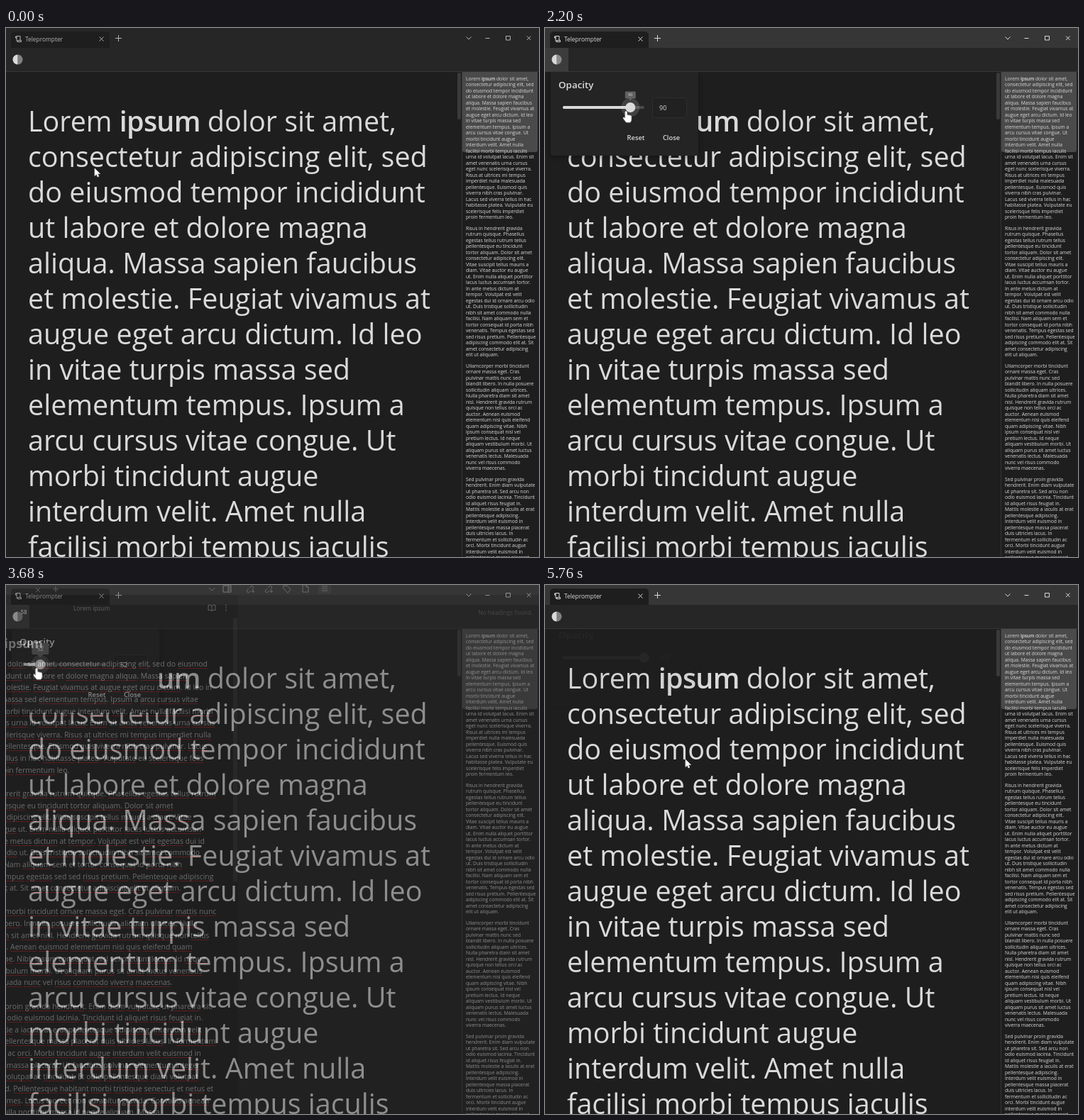
Animation of 751 by 746 pixels, one loop 6000 ms. Source, as an HTML page:

```html
<!DOCTYPE html>
<html lang="en">
<head>
<meta charset="utf-8">
<title>Teleprompter</title>
<style>
  html, body { margin: 0; width: 100%; height: 100%; overflow: hidden; background: #1e1e1e; }
  body { font-family: "Open Sans", "Noto Sans", sans-serif; color: #dadada; }
  #stage { position: relative; width: 751px; height: 746px; overflow: hidden; }
  #stage div, #stage svg { position: absolute; }
  .layer { left: 0; top: 0; width: 751px; height: 746px; overflow: hidden; background: #1e1e1e; }
  .copy { white-space: pre; }
  .copy p { margin: 0; }
  .copy b { font-weight: 600; letter-spacing: -.02em; }
  .large { font-size: 39.5px; line-height: 50px; }
  .large p { margin-bottom: 41.2px; }
  .label { font-size: 8.4px; line-height: 12px; white-space: nowrap; }
  svg { fill: none; stroke: currentColor; overflow: visible; }
  svg text { fill: currentColor; stroke: none; }

  #back .copy { left: -65px; top: 103px; font-size: 10.45px; line-height: 16.64px; }
  #back .copy p { margin-bottom: 16.64px; }
  #back u { text-decoration: underline 1px #b01c1c; text-underline-offset: 2px; text-decoration-skip-ink: none; }
  #back h1 { position: absolute; right: 699px; top: 70px; margin: 0; font-size: 17.7px; line-height: 24px; font-weight: 700; white-space: nowrap; }
  #strip { left: 0; top: 0; width: 751px; height: 14px; background: #363636; }
  #side { left: 327px; top: 14px; width: 424px; height: 732px; background: #262626; }

  #main { left: 31px; top: 105.7px; }
  #mini { left: 648.2px; top: 66.6px; transform: scale(.17); transform-origin: 0 0; }
  #view { left: 643px; top: 62px; width: 106px; height: 113px; background: #4a4a4a; border-radius: 0 0 3px 3px; }
  #bar { left: 0; top: 0; width: 751px; height: 28px; }
  #tab { left: 7px; top: 5px; width: 139px; height: 23px; border-radius: 5px 5px 0 0; background: #1e1e1e; }
  #head { left: 0; top: 28px; width: 751px; height: 33px; background: #262626; border-bottom: 1px solid #363636; }
  #button { left: 0; top: 0; width: 33px; height: 33px; background: #3c3c3c; }

  #popup { left: 8px; top: 61px; width: 208px; height: 119px; border-radius: 4px; background: #242424; box-shadow: 0 2px 7px rgba(0,0,0,.35); }
  #popup .bold { font-weight: 600; font-size: 9.3px; line-height: 24px; height: 24px; width: 44px; top: 82px; text-align: center; border-radius: 3px; }
  #title { left: 11px; top: 9px; font-size: 13.4px; line-height: 20px; font-weight: 600; }
  #rail, #fill { left: 17px; top: 49px; height: 4px; border-radius: 2px; }
  #rail { width: 115px; background: #4a4a4a; }
  #fill { background: #dadada; }
  #knob { left: 17px; top: 51px; }
  #knob div { border-radius: 50%; }
  #halo { left: -13px; top: -13px; width: 26px; height: 26px; background: rgba(218,218,218,.16); }
  #dot { left: -7px; top: -7px; width: 14px; height: 14px; background: #dadada; }
  #knob #tip { left: -12px; top: -30px; width: 24px; height: 16px; border-radius: 2px; background: #616161; font-size: 8.6px; line-height: 16px; text-align: center; transform-origin: 50% 125%; }
  #tip::after { content: ""; position: absolute; left: 9px; top: 13px; width: 6px; height: 6px; background: #616161; transform: rotate(45deg); }
  #field { left: 143px; top: 37px; width: 38px; height: 27px; padding-left: 9px; border: 1px solid #2e2e2e; border-radius: 4px; background: #212121; font-size: 9px; line-height: 27px; }
  #hint { left: 4px; top: 72px; width: 125px; height: 24px; border-radius: 4px; background: #0c0c0c; font-size: 9.5px; line-height: 24px; text-align: center; white-space: nowrap; }
  #hint::before { content: ""; position: absolute; left: 8px; top: -5px; border: 5px solid transparent; border-top: 0; border-bottom-color: #0c0c0c; }
  #cursor { left: 0; top: 0; }
</style>
</head>
<body>
<div id="stage">
  <div id="back" class="layer">
    <div id="side"></div>
    <div id="strip"></div>
    <div style="left:320px;top:47px;width:6px;height:371px;background:#363636"></div>
    <div style="left:440px;top:0;width:18px;height:12px;border-radius:2px;background:#484848"></div>
    <div class="label" style="left:95px;top:26.5px;color:#b3b3b3">Lorem ipsum</div>
    <div class="label" style="right:9px;top:33px;color:#777">No headings found.</div>
    <h1>Lorem ipsum</h1>
    <div class="copy"></div>
    <svg width="751" height="60" color="#b3b3b3">
      <path d="M42 4l6 6m0-6l-6 6M66 6h8m-4-4v8M286 4l4 4 4-4"/>
      <path d="M306 1h11v9h-11zM313 1v9m1-6h2m-2 3h2" stroke="#dadada"/>
      <path d="M285 28.500q3-1 5 1 2-2 5-1v7q-3-1-5 1-2-2-5-1zM290 29.500v7"/>
      <path d="M310 28v1.400m0 2v1.400m0 2v1.400" stroke-width="1.500"/>
      <g id="links"><path d="M343 4l2-2a2 2 0 013 3l-2 2m-1 1l-2 2a2 2 0 01-3-3l2-2m4 4h4m-2-2v4"/></g>
      <use href="#links" x="26"/>
      <path d="M391 1h5l5 5-4 5-6-6zM394 4h.5M418 0h5l3 3v7h-8zM423 0v3h3M445 2h8m-8 3h8m-8 3h8"/>
    </svg>
  </div>

  <div id="front" class="layer">
    <div id="main" class="copy large"></div>
    <div style="left:636px;top:63px;width:5px;height:66px;border-radius:2px;background:#3a3a3a"></div>
    <div style="left:642px;top:62px;width:109px;height:684px;background:#1e1e1e;box-shadow:inset 1px 0 #363636"></div>
    <div id="view"></div>
    <div id="mini" class="copy large"></div>

    <div id="popup">
      <div id="title">Opacity</div>
      <div id="rail"></div>
      <div id="fill"></div>
      <div id="knob"><div id="halo"></div><div id="dot"></div><div id="tip"></div></div>
      <div id="field"></div>
      <div id="reset" class="bold" style="left:98px">Reset</div>
      <div class="bold" style="left:148px">Close</div>
    </div>

    <div id="bar">
      <div id="tab"></div>
      <div class="label" style="left:27px;top:10px">Teleprompter</div>
      <svg width="751" height="28">
        <path d="M15 17v-5h-1.500v2h2M14.500 11.500h5.500v6M16.500 17.500h5v2h-5zM16.500 19.500q-1.500 0-1.500-2.500"/>
        <path d="M131.500 12.500l6 6m0-6l-6 6M154 14.500h9m-4.500-4.500v9M648.500 12.500l3.500 3.500 3.500-3.500M675.500 14.500h6M704.500 11.500h6v5.500h-6zM734 11.500l5.500 5.500m0-5.500l-5.500 5.500"/>
      </svg>
    </div>
    <div id="head">
      <div id="button"></div>
      <svg width="40" height="33">
        <defs><pattern id="dots" width="2.400" height="2.400" patternUnits="userSpaceOnUse">
          <path d="M0 0h1.200v1.200h-1.200zM1.200 1.200h1.200v1.200h-1.200z" fill="#dadada" stroke="none"/>
        </pattern></defs>
        <path d="M16.500 9.500a7 7 0 000 14z" fill="#dadada" stroke="none"/>
        <path d="M16.500 9.500a7 7 0 010 14z" fill="url(#dots)" stroke="none"/>
        <text id="badge" x="20.500" y="13" font-size="8" font-weight="600"></text>
      </svg>
    </div>
    <div id="hint">Change window opacity</div>
  </div>

  <svg id="cursor" width="14" height="18" stroke="#111" stroke-width=".8" stroke-linejoin="round">
    <path id="arrow" fill="#fff" d="M0 0v10.500l2.400-2.200 1.700 3.700 1.700-.8-1.700-3.600h3.400z"/>
    <path id="hand" fill="#fff" d="M0 1.200q1.200-1.600 2.400 0v4.800q1.200-.9 2.200.3 1.200-.8 2.100.4 1.500-.5 2 .8v4q0 2.500-1.600 4.500h-5.600l-4.200-5.500q-.5-1.700 1.200-1.300l1.500 1.200z"/>
  </svg>
</div>

<script>
// Line ends: "|" teleprompter, "/" editor, "#" both.
const paragraphs = [
  "Lorem *ipsum* dolor sit amet,|consectetur adipiscing elit, sed|do eiusmod/tempor incididunt|ut labore et dolore magna|aliqua. Massa sapien/faucibus|et molestie. Feugiat vivamus at|augue eget arcu dictum. Id leo|in/vitae turpis massa sed|elementum tempus. Ipsum a|arcu cursus vitae/congue. Ut|morbi tincidunt augue|interdum velit. Amet nulla|facilisi morbi/tempus iaculis|urna id volutpat lacus. Enim sit|amet venenatis urna cursus#eget nunc scelerisque viverra.|Risus at ultrices mi tempus|imperdiet nulla/malesuada|pellentesque. Euismod quis|viverra nibh cras pulvinar.|Lacus/sed viverra tellus in hac|habitasse platea. Vulputate eu|scelerisque felis/imperdiet|proin fermentum leo.",
  "Risus in hendrerit gravida|rutrum quisque. Phasellus|egestas tellus rutrum/tellus|pellentesque eu tincidunt|tortor aliquam. Dolor sit amet#consectetur adipiscing elit.|Vitae suscipit tellus mauris a|diam. Vitae/auctor eu augue|ut. Enim nulla aliquet porttitor|lacus luctus accumsan/tortor.|In ante metus dictum at|tempor. Volutpat est velit|egestas dui id/ornare arcu odio|ut. Duis tristique sollicitudin|nibh sit amet commodo/nulla|facilisi. Nam aliquam sem et|tortor consequat id porta nibh#venenatis. Tempus egestas sed|sed risus pretium. Pellentesque|adipiscing/commodo elit at. Sit|amet consectetur adipiscing|elit ut aliquam.",
  "Ullamcorper morbi tincidunt|ornare massa eget. Cras|pulvinar mattis nunc/sed|blandit libero. In nulla posuere|sollicitudin aliquam ultrices.|Nulla/pharetra diam sit amet|nisl. Hendrerit gravida rutrum|quisque non tellus/orci ac|auctor. Aenean euismod|elementum nisi quis eleifend|quam/adipiscing vitae. Nibh|ipsum consequat nisl vel|pretium lectus. Id neque#aliquam vestibulum morbi. Ut|aliquam purus sit amet luctus|venenatis/lectus. Malesuada|nunc vel risus commodo|viverra maecenas.",
  "Sed pulvinar proin gravida|hendrerit. Enim diam vulputate|ut pharetra sit./Sed arcu non|odio euismod lacinia. Tincidunt|id aliquet risus feugiat in.#Mattis molestie a iaculis at erat|pellentesque adipiscing.|Interdum velit/euismod in|pellentesque massa placerat|duis ultricies lacus. In|fermentum/et sollicitudin ac|orci. Morbi tincidunt augue|interdum velit euismod in#pellentesque massa placerat.|Ut faucibus pulvinar elementum|integer/enim neque volutpat ac|tincidunt. Et odio pellentesque|diam volutpat/commodo sed.|Pellentesque habitant morbi|tristique senectus et netus et#malesuada fames. Lacus laoreet|non curabitur gravida. Convallis|aenean/et tortor at nulla porttitor|massa id neque aliquam. Massa"
];
const $ = id => document.getElementById(id);
const wrap = (text, mark) => text.replace(/[|\/#]/g, c => c === mark || c === "#" ? "\n" : " ");
const bold = text => text.replace(/\*(.+?)\*/g, "<b>$1</b>");
const render = (mark, style = s => s) =>
  paragraphs.map(p => `<p>${bold(style(wrap(p, mark)))}</p>`).join("");

$("main").innerHTML = $("mini").innerHTML = render("|");
document.querySelector("#back .copy").innerHTML =
  render("/", s => s.replace(/[a-z]{4,}/gi, "<u>$&</u>"));

const LOOP = 6000, RESET = 4600, LEFT = 25, SPAN = 115;
const path = [
  [40, 125, 198], [640, 20, 44], [1480, 20, 44], [1700, 95, 113], [1840, 142, 117],
  [2080, 140, 117], [2200, 113, 117], [2440, 86, 117], [2760, 86, 117], [3120, 67, 117],
  [3440, 67, 117], [3920, 17, 117], [4080, 17, 117], [4400, 123, 156], [4740, 123, 156],
  [5340, 198, 246]
];
const clamp = (v, a = 0, b = 1) => Math.min(b, Math.max(a, v));
const ramp = (t, start, length) => clamp((t - start) / length);
const within = (t, a, b) => t >= a && t < b;

function pointer(t) {
  const i = path.findIndex(p => p[0] > t);
  if (i === 0) return path[0].slice(1);
  if (i < 0) return path[path.length - 1].slice(1);
  const [t0, x0, y0] = path[i - 1], [t1, x1, y1] = path[i];
  const f = (t - t0) / (t1 - t0), e = f * f * (3 - 2 * f);
  return [x0 + (x1 - x0) * e, y0 + (y1 - y0) * e];
}

// Share of the slider travel, 0 at 40 % and 1 at 100 %.
function level(t) {
  if (t < 2080) return 1;
  return clamp((pointer(Math.min(t, 4040))[0] - LEFT) / SPAN);
}
const percent = share => Math.round(40 + 60 * share);

function draw(t) {
  const done = t >= RESET;
  const back = 1 - ramp(t, RESET, 150);
  const knob = done ? 1 - back * back : level(t - 42);
  const value = percent(done ? 1 : knob);
  const shown = done ? 100 : percent(level(t - 120));
  const open = within(t, 1240, 5560);
  const pop = t < 5560 ? ramp(t, 1240, 160) : 1 - Math.min(t - 5560, 200) / 208;
  const focused = t >= 1080;

  $("front").style.opacity = shown / 100;
  $("badge").textContent = shown < 100 ? shown : "";
  $("bar").style.background = focused ? "#363636" : "#262626";
  $("bar").style.color = focused ? "#dadada" : "#b3b3b3";
  $("button").style.opacity = open ? 1 : 0;

  $("popup").style.opacity = pop;
  $("popup").style.transform = `translateY(${-10 * (1 - pop)}px)`;
  $("fill").style.width = SPAN * knob + "px";
  $("knob").style.transform = `translateX(${SPAN * knob}px)`;
  $("field").textContent = $("tip").textContent = value;
  $("halo").style.opacity = ramp(t, 1800, 120) * (1 - ramp(t, 4120, 120));
  $("tip").style.transform = `scale(${ramp(t, 2120, 130) * (1 - ramp(t, 4080, 130))})`;
  $("reset").style.background = within(t, 4380, 4860) ? "#313131" : "none";

  const hint = t < 1080 ? ramp(t, 680, 200) : 0;
  $("hint").style.opacity = hint;
  $("hint").style.transform = `translateY(${10 * (1 - hint)}px)`;

  const [x, y] = pointer(t);
  const hand = within(t, 600, 1540) || within(t, 1740, 4120) || within(t, 4360, 4860);
  $("cursor").style.transform = `translate(${x}px, ${y}px)`;
  $("hand").style.display = hand ? "" : "none";
  $("arrow").style.display = hand ? "none" : "";
}

const start = performance.now();
function tick() {
  draw((performance.now() - start) % LOOP);
  requestAnimationFrame(tick);
}
tick();
</script>
</body>
</html>
```
